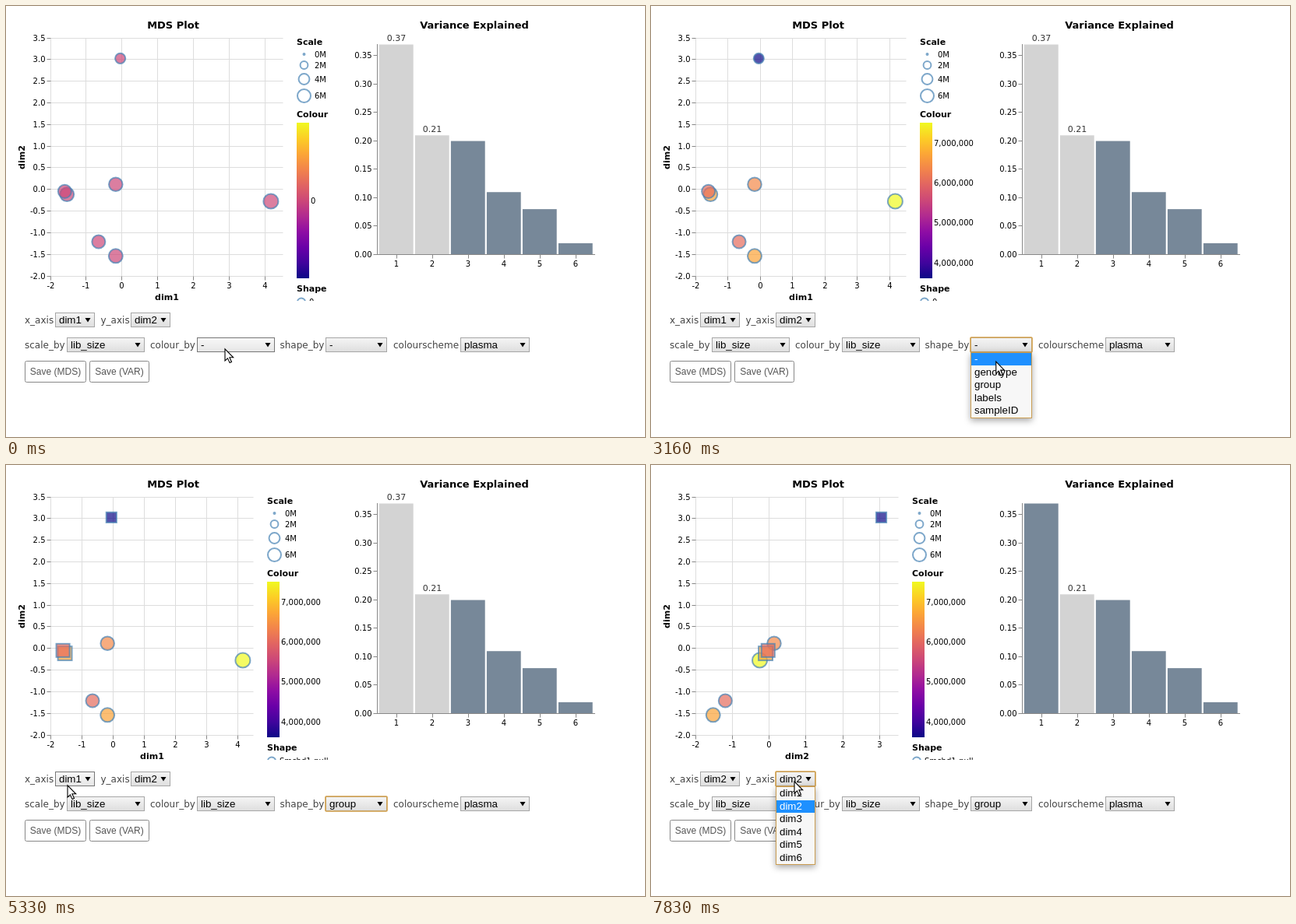
Recreate the animation shown at these times as an HTML page. Size 820 by 554 pixels, loop 8000 ms.

```html
<!DOCTYPE html>
<html lang="en">
<head>
<meta charset="utf-8">
<title>MDS Plot</title>
<style>
html, body { margin: 0; width: 100%; height: 100%; overflow: hidden; background: #fff; }
svg { display: block; width: 820px; height: 554px; font-family: "DejaVu Sans", sans-serif; }
.ui { font-family: "Liberation Sans", Arial, sans-serif; font-size: 13.333px; }
.btn { font-family: "Liberation Sans", Arial, sans-serif; font-size: 12px; fill: #555; }
.lab { font-size: 12px; fill: #444; }
.tick { font-size: 10px; }
.val { font-size: 11px; fill: #333; }
.head { font-size: 11px; font-weight: bold; }
.title { font-size: 13px; font-weight: bold; }
text { white-space: pre; }
</style>
</head>
<body>
<svg id="stage" viewBox="0 0 820 554" xmlns="http://www.w3.org/2000/svg"></svg>
<script>
const LOOP = 8000;
const stage = document.getElementById('stage');
const PLASMA = ['0d0887', '41049d', '6a00a8', '8f0da4', 'b12a90', 'cc4778',
  'e16462', 'f2844b', 'fca636', 'fcce25', 'f0f921'];
const LOW = 3.61, HIGH = 7.51;   // library size range, millions
const LEFT = 57.5, TOP = 41.5, HEIGHT = 306;

// dim1, dim2, library size in millions, second group
const SAMPLES = [
  [-0.183, -1.53, 6.7, false],
  [-0.662, -1.2, 6.03, false],
  [-0.183, 0.125, 6.4, false],
  [4.16, -0.265, 7.51, false],
  [-0.055, 3.035, 3.61, true],
  [-1.548, -0.106, 6.68, true],
  [-1.61, -0.038, 6.05, true],
];
const VARIANCE = [0.37, 0.21, 0.20, 0.11, 0.08, 0.02];

const DIMS = [1, 2, 3, 4, 5, 6].map(n => 'dim' + n);
const SELECTS = {
  x: { name: 'x_axis', lx: 24, x: 63, y: 394, w: 51, items: DIMS },
  y: { name: 'y_axis', lx: 121.5, x: 160, y: 394, w: 51, items: DIMS },
  scale: { name: 'scale_by', lx: 24, x: 78, y: 426, w: 100, items: [] },
  colour: { name: 'colour_by', lx: 185, x: 245, y: 426, w: 100, items: ['-', 'lib_size', 'norm_factors'] },
  shape: { name: 'shape_by', lx: 351.5, x: 410, y: 426, w: 79,
    items: ['-', 'genotype', 'group', 'labels', 'sampleID'] },
  scheme: { name: 'colourscheme', lx: 497, x: 583, y: 426, w: 89, items: [] },
};

// Pointer keys: step, x, y
const POINTER = [
  [0, 280.5, 440], [3, 280.5, 440], [5, 280, 442], [8, 278.5, 467], [9, 278.5, 468],
  [11, 278.5, 469], [15, 441.5, 438], [17, 441.5, 440], [20, 442.5, 462], [23, 443.5, 478],
  [25, 444, 486], [26, 443, 485], [31, 78.5, 411], [33, 78.5, 411], [37, 86.5, 431],
  [41, 86.5, 431], [45, 183.5, 406], [48, 183.5, 406],
];

const between = (k, a, b) => k >= a && k < b;

function pointerAt(k) {
  let i = 0;
  while (i < POINTER.length - 2 && POINTER[i + 1][0] <= k) i++;
  const [k0, x0, y0] = POINTER[i], [k1, x1, y1] = POINTER[i + 1];
  const u = Math.min(1, (k - k0) / (k1 - k0)), e = u * u * (3 - 2 * u);
  return [x0 + (x1 - x0) * e, y0 + (y1 - y0) * e];
}

function stateAt(k) {
  return {
    pointer: pointerAt(k),
    open: between(k, 4, 11) ? 'colour' : between(k, 16, 26) ? 'shape'
      : between(k, 33, 41) ? 'x' : k >= 46 ? 'y' : '',
    focus: k < 4 ? '' : k < 16 ? 'colour' : k < 33 ? 'shape' : k < 46 ? 'x' : 'y',
    value: {
      x: k < 41 ? 'dim1' : 'dim2', y: 'dim2', scale: 'lib_size',
      colour: k < 11 ? '-' : 'lib_size', shape: k < 26 ? '-' : 'group', scheme: 'plasma',
    },
  };
}

const text = (x, y, s, cls, extra = '') => `<text x="${x}" y="${y}" class="${cls}" ${extra}>${s}</text>`;
const rect = (x, y, w, h, extra) => `<rect x="${x}" y="${y}" width="${w}" height="${h}" ${extra}/>`;
const line = (x1, y1, x2, y2, c) => `<path d="M${x1} ${y1}L${x2} ${y2}" stroke="${c}"/>`;
const circle = (x, y, r, extra) => `<circle cx="${x}" cy="${y}" r="${r}" ${extra}/>`;
const MID = 'text-anchor="middle"', END = 'text-anchor="end"';

function plasma(u) {
  const i = Math.min(9, Math.floor(u * 10)), f = u * 10 - i;
  const part = (n, c) => parseInt(PLASMA[n].substr(c, 2), 16);
  return `rgb(${[0, 2, 4].map(c => Math.round(part(i, c) * (1 - f) + part(i + 1, c) * f))})`;
}

const radius = m => 3.47 * Math.sqrt(m);

function scatter(v) {
  const coloured = v.colour !== '-', grouped = v.shape !== '-';
  const width = !coloured ? 298 : grouped ? 260 : 270;
  const dim = v.x === 'dim1' ? 0 : 1, max = dim ? 3.5 : 4.5;
  const px = n => (n + 2) / (max + 2) * width;
  const py = n => (3.5 - n) / 5.5 * HEIGHT;
  const bottom = TOP + HEIGHT, right = LEFT + width;
  let grid = '', axes = '', marks = '';

  for (let n = -2; n <= max; n++) {
    const x = LEFT + Math.floor(px(n));
    grid += line(x, TOP, x, bottom, '#ddd');
    axes += line(x, bottom, x, bottom + 5, '#888') + text(x, bottom + 15, n, 'tick', MID);
  }
  for (let n = -2; n <= 3.5; n += 0.5) {
    const y = TOP + Math.floor(py(n) + 1e-6);
    grid += line(LEFT, y, right, y, '#ddd');
    axes += line(LEFT - 5, y, LEFT, y, '#888') + text(LEFT - 7, y + 3.5, n.toFixed(1), 'tick', END);
  }
  for (const s of SAMPLES) {
    const x = LEFT + px(s[dim]), y = TOP + py(s[1]), r = radius(s[2]);
    const fill = `fill="${plasma(coloured ? (s[2] - LOW) / (HIGH - LOW) : 0.5)}"`;
    marks += grouped && s[3] ? rect(x - r, y - r, 2 * r, 2 * r, fill) : circle(x, y, r, fill);
  }
  return text(214.5, 29, 'MDS Plot', 'title', MID) + grid + axes
    + text(LEFT + width / 2, 378, v.x, 'head', MID)
    + text(0, 0, v.y, 'head', MID + ' transform="translate(24 194.5) rotate(-90)"')
    + `<g stroke="steelblue" stroke-width="2" fill-opacity=".7" stroke-opacity=".7">${marks}</g>`
    + legend(right + 17.5, coloured, grouped);
}

function legend(x, coloured, grouped) {
  const ring = 'fill="none" stroke="steelblue" stroke-width="2" stroke-opacity=".7"';
  let out = text(x, 50, 'Scale', 'head') + text(x, 143, 'Colour', 'head') + text(x, 367, 'Shape', 'head');
  [62, 76, 94, 115.5].forEach((y, i) => {
    out += circle(x + 9.5, y, i ? radius(2 * i) : 1, ring) + text(x + 23, y + 3.5, 2 * i + 'M', 'tick');
  });
  out += rect(x, 150, 16, 200, 'fill="url(#plasma)"');
  if (coloured) {
    for (let m = 4; m <= 7; m++) {
      const y = 350 - (m - LOW) / (HIGH - LOW) * 200;
      out += text(x + 18, y + 3.5, m + ',000,000', 'tick');
    }
  } else out += text(x + 18, 253.5, '0', 'tick');
  return out + circle(x + 6, 380.5, 5, ring) + text(x + 16, 383.5, grouped ? 'Smchd1-null' : '0', 'tick');
}

function bars(v) {
  const x0 = 476.5, base = 319.5, unit = 270 / 0.37;
  let out = text(601, 29, 'Variance Explained', 'title', MID);
  VARIANCE.forEach((n, i) => {
    const chosen = [v.x, v.y].includes(DIMS[i]), h = n * unit, mid = 501 + 46 * i;
    out += rect(478.9 + 46 * i, base - h, 43.8, h, `fill="${chosen ? '#d3d3d3' : '#778899'}"`);
    if (chosen) out += text(mid, Math.round(base - h - 4.6), n.toFixed(2), 'val', MID);
    out += line(mid + .5, base, mid + .5, base + 5, '#888') + text(mid, 335, i + 1, 'tick', MID);
  });
  for (let i = 0; i < 8; i++) {
    const y = 49.5 + Math.floor((0.37 - i * 0.05) * unit + 1e-6);
    out += line(x0 - 5, y, x0, y, '#888') + text(x0 - 7, y + 3.5, (i * 0.05).toFixed(2), 'tick', END);
  }
  return out + line(x0, 49, x0, 320, '#888') + line(x0, base, 756, base, '#888');
}

function select(key, st) {
  const s = SELECTS[key], [mx, my] = st.pointer;
  const over = !st.open && mx >= s.x && mx < s.x + s.w && my >= s.y && my < s.y + 19;
  const cx = s.x + s.w - 9, ay = s.y + 7;
  let out = text(s.lx, s.y + 14, s.name, 'lab')
    + rect(s.x + .5, s.y + .5, s.w - 1, 18, `fill="url(#${over ? 'hover' : 'face'})" stroke="${over ? '#777' : '#a6a6a6'}"`);
  if (st.focus === key) {
    out += rect(s.x, s.y, s.w, 19, 'rx="1" fill="none" stroke="#d3a04a" stroke-width="1.6"');
  }
  return out + text(s.x + 5, s.y + 14, st.value[key], 'ui')
    + `<path d="M${cx - 3.5} ${ay}h7l-3.5 5.5z"/>`;
}

function menu(st) {
  if (!st.open) return '';
  const s = SELECTS[st.open], top = s.y + 19, row = 16.5, n = s.items.length;
  const at = Math.floor((st.pointer[1] - top - 1) / row);
  const active = at >= 0 && at < n ? at : s.items.indexOf(st.value[st.open]);
  let out = rect(s.x + .5, top + .5, s.w - 1, Math.round(n * row + 1), 'fill="#f7f7f7" stroke="#cb9d51" filter="url(#shadow)"');
  s.items.forEach((item, i) => {
    const y = top + 1 + i * row, on = i === active;
    if (on) out += rect(s.x + 1, Math.round(y), s.w - 2, 16, 'fill="#1e90ff"');
    out += text(s.x + 5, Math.round(y + 12), item, 'ui', on ? 'fill="#fff"' : '');
  });
  return out;
}

const button = (x, w, s) => rect(x + .5, 456.5, w - 1, 27, 'rx="2" fill="#fff" stroke="#888"')
  + text(x + w / 2, 474, s, 'btn', MID);

const arrow = ([x, y]) => `<path transform="translate(${x} ${y})" fill="#fff" stroke="#000" stroke-width="1.1"
  d="M.5 .8V16L4 12.8L6.6 18.6L9 17.5L6.4 11.8H11.2Z"/>`;

const ramp = (id, colours, dir) => `<linearGradient id="${id}" ${dir}>`
  + colours.map((c, i) => `<stop offset="${i / (colours.length - 1)}" stop-color="${c}"/>`).join('')
  + '</linearGradient>';
const DEFS = '<defs>' + ramp('plasma', PLASMA.map(c => '#' + c), 'x1="0" y1="1" x2="0" y2="0"')
  + ramp('face', ['#f5f5f5', '#dedede'], 'x1="0" y1="0" x2="0" y2="1"')
  + ramp('hover', ['#f8f8f8', '#e6e6e6'], 'x1="0" y1="0" x2="0" y2="1"')
  + `<filter id="shadow" x="-30%" y="-30%" width="160%" height="170%">
      <feDropShadow dx="0" dy="3" stdDeviation="4" flood-color="#000" flood-opacity=".35"/></filter>
    <clipPath id="chart"><rect width="820" height="379"/></clipPath></defs>`;

function draw(k) {
  const st = stateAt(k);
  stage.innerHTML = DEFS
    + `<g clip-path="url(#chart)">${scatter(st.value)}${bars(st.value)}</g>`
    + Object.keys(SELECTS).map(key => select(key, st)).join('')
    + button(24, 79, 'Save (MDS)') + button(107, 77, 'Save (VAR)')
    + menu(st) + arrow(st.pointer);
}

let shown = -1;
function tick() {
  const k = Math.floor((performance.now() % LOOP + 7) * 6 / 1000) % 48;
  if (k !== shown) draw(shown = k);
  requestAnimationFrame(tick);
}
tick();
</script>
</body>
</html>
```
